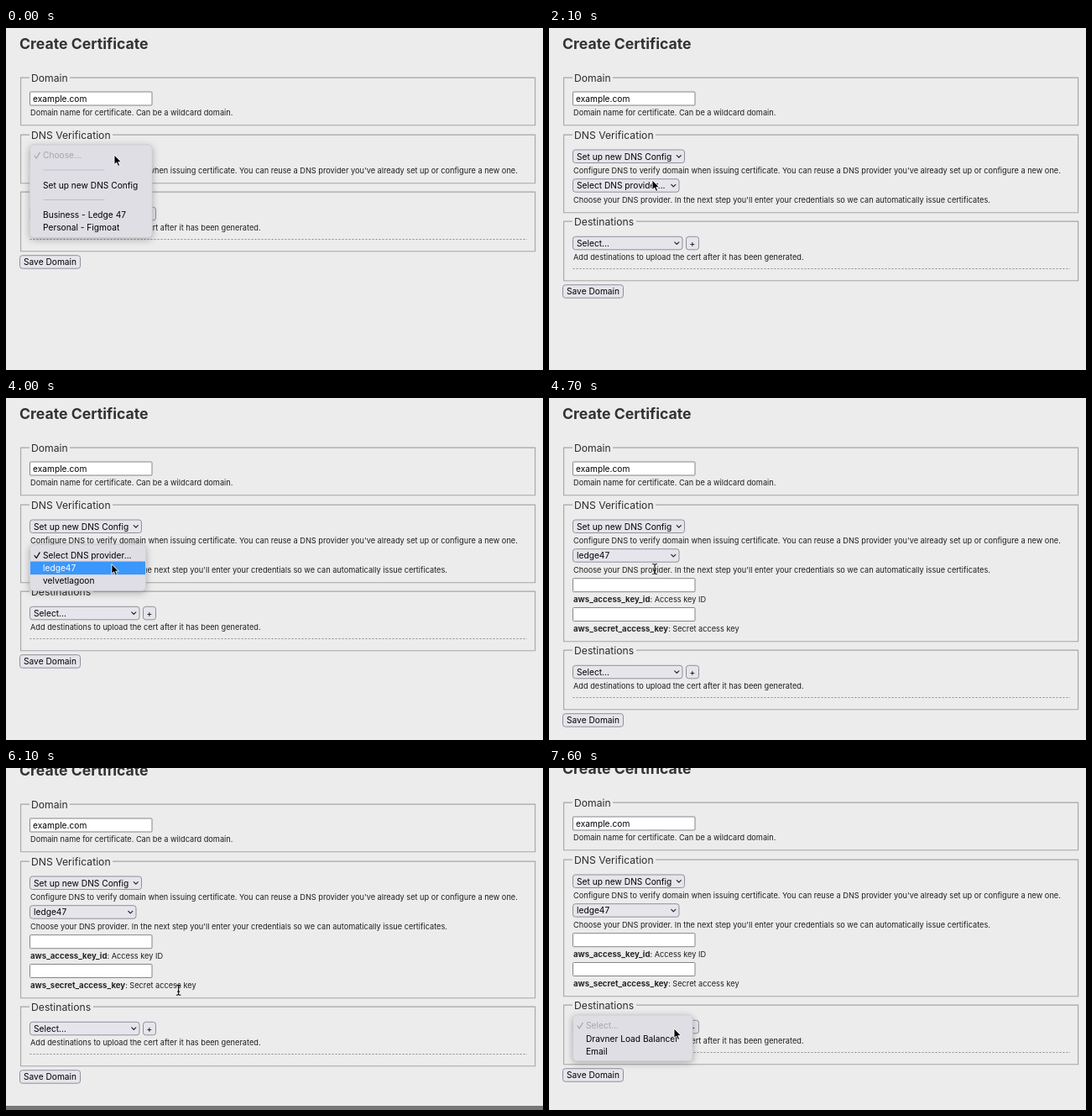
An HTML page that plays this animation: 640 px wide and 407 px high, repeating every 8000 ms.

```html
<!DOCTYPE html>
<html lang="en">
<head>
<meta charset="utf-8">
<title>Create Certificate</title>
<style>
  html, body { margin: 0; width: 100%; height: 100%; overflow: hidden; background: #ececec; }
  svg { display: block; width: 100vw; height: 100vh; font-family: Inter, "Noto Sans", sans-serif; }
  text { white-space: pre; }
  .title { font-size: 17.65px; font-weight: 700; fill: #333; }
  .legend { font-size: 12.2px; fill: #2c2c2c; }
  .note { font-size: 9.2px; fill: #1e1e1e; }
  .key { font-size: 9.65px; font-weight: 700; fill: #262626; }
  .ui { font-size: 10.2px; fill: #000; }
  .off { fill: #a6a5ac; }
  .frame { fill: none; stroke: #a6a6a6; stroke-width: 1.1; }
  .box { fill: #fff; stroke: #85858c; }
  .button { fill: #e6e5ec; stroke: #8f8f9d; }
  .mark { fill: none; stroke-width: 1.2; stroke-linecap: round; stroke-linejoin: round; }
  .panel { fill: #dfdee5; stroke: #c6c5cc; stroke-width: .6; filter: drop-shadow(0 2px 4px rgba(0,0,0,.28)); }
</style>
</head>
<body>
<svg id="stage" viewBox="0 0 640 407"></svg>
<script>
const LOOP = 8000, STEP = 100;
const BLUE = '#3b97fb';

const text = (cls, x, y, s, attrs = '') => `<text class="${cls}" x="${x}" y="${y}" ${attrs}>${s}</text>`;
const rect = (cls, x, y, w, h, r = 0) =>
  `<rect class="${cls}" x="${x}" y="${y}" width="${w}" height="${h}" rx="${r}"/>`;
const input = (y, value = '') => rect('box', 28.5, y, 145.5, 16, 1) + text('ui', 32, y + 12, value);
const button = (x, y, w, s, tx) => rect('button', x, y, w, 15.5, 3) + text('ui', tx, y + 11.6, s);
const select = (y, w, s, id = '') => rect('button', 28.5, y, w, 15.5, 3) +
  text('ui', 33, y + 11.6, s, id && `id="${id}"`) +
  `<path class="mark" stroke="#222" d="M${w + 19.3} ${y + 6.6}l2.5 2.5 2.5-2.5"/>`;
const frame = (top, bottom, gapEnd) => `M28 ${top}H17.6V${bottom}H630.6V${top}H${gapEnd}`;
const fieldset = (top, bottom, gapEnd, name, id = '') =>
  `<path class="frame" id="${id}" d="${frame(top, bottom, gapEnd)}"/>` + text('legend', 30, top + 5, name);
const tick = (y, color) => `<path class="mark" stroke="${color}" d="M34 ${y}l2.2 3 4-6.6"/>`;
const rule = y => `<path stroke="#bdbcc3" d="M44.5 ${y}H117.5"/>`;
const key = (y, name, label) =>
  `<text x="29" y="${y}"><tspan class="key">${name}</tspan><tspan class="note">: ${label}</tspan></text>`;

// rows: [centre y, label, id, class]
const menu = (id, top, w, h, rows, extra = '') => `<g id="${id}">` + rect('panel', 28.3, top, w, h, 5) +
  `<rect id="${id}Hover" x="29" width="${w - 1.5}" height="15.6" fill="${BLUE}" opacity="0"/>` + extra +
  rows.map(([y, s, rowId, cls = '']) => text('ui ' + cls, 44, y + 3.7, s, rowId ? `id="${rowId}"` : '')).join('') + '</g>';

document.getElementById('stage').innerHTML = `
<rect width="640" height="407" fill="#ececec"/>
<g id="page">
  ${text('title', 16, 25, 'Create Certificate')}
  ${fieldset(59.1, 115.8, 76, 'Domain')}
  ${input(76, 'example.com')}
  ${text('note', 29, 104, 'Domain name for certificate. Can be a wildcard domain.')}
  ${fieldset(127.1, 184.8, 127, 'DNS Verification', 'dnsFrame')}
  ${select(145, 133, 'Choose...', 'config')}
  ${text('note', 29, 172.7, "Configure DNS to verify domain when issuing certificate. You can reuse a DNS provider you've already set up or configure a new one.")}
  <g id="providerField">
    ${select(179.7, 126.5, 'Select DNS provider...', 'provider')}
    ${text('note', 29, 207.5, "Choose your DNS provider. In the next step you'll enter your credentials so we can automatically issue certificates.")}
  </g>
  <g id="keyFields">
    ${input(214.7)}${key(243, 'aws_access_key_id', 'Access key ID')}
    ${input(249.5)}${key(277.6, 'aws_secret_access_key', 'Secret access key')}
  </g>
  <g id="lower">
    ${fieldset(195.1, 265.8, 104, 'Destinations')}
    ${select(213.3, 130.5, 'Select...')}
    ${button(163.5, 213.3, 15, '+', 167.5)}
    ${text('note', 29, 241, 'Add destinations to upload the cert after it has been generated.')}
    <path stroke="#8c8c8c" stroke-dasharray="2 2" d="M28.5 251.5H621"/>
    ${button(16.5, 270.7, 72, 'Save Domain', 21)}
  </g>
</g>
<rect id="bar" y="402" width="640" height="5" fill="#777"/>
${menu('configMenu', 139, 146, 110.5, [
  [151.5, 'Choose...', '', 'off'], [187, 'Set up new DNS Config', 'newRow'],
  [222, 'Business - Ledge 47'], [237.7, 'Personal - Figmoat']
], tick(152, '#a6a5ac') + rule(169) + rule(204.5))}
${menu('providerMenu', 174.5, 138.5, 55, [
  [187, 'Select DNS provider...', 'firstRow'], [202, 'ledge47', 'secondRow'], [217.7, 'velvetlagoon']
], '<g id="firstTick">' + tick(187.5, 'currentColor') + '</g>')}
${menu('destMenu', 294, 143, 54.7, [
  [306.3, 'Select...', '', 'off'], [321.8, 'Dravner Load Balancer'], [337.3, 'Email']
], tick(307, '#a6a5ac'))}
<path id="arrow" fill="#000" stroke="#fff" stroke-width=".9" d="M0 0V11.6L2.7 9.1 4.6 13.4 6.6 12.5 4.8 8.4H8.5Z"/>
<path id="beam" fill="none" stroke="#111" stroke-width="1.1" d="M-2.8-6Q0-6 0-4.5Q0-6 2.8-6M0-4.5V4.5M-2.8 6Q0 6 0 4.5Q0 6 2.8 6M-1.5 1.8H1.5"/>`;

const el = {};
document.querySelectorAll('[id]').forEach(n => { if (n.id) el[n.id] = n; });

const clamp = v => Math.max(0, Math.min(1, v));
const ease = v => v * v * (3 - 2 * v);
const show = (node, on) => node.setAttribute('opacity', +on);
const shift = (node, x, y) => node.setAttribute('transform', `translate(${x} ${y})`);
const span = (t, a, b) => t >= a && t < b;

// [start, end, x, y]: the pointer eases to x,y in that time
const moves = [
  [800, 1400, 123, 181], [2400, 2600, 125.5, 187], [3800, 4100, 126, 201.5],
  [5100, 5600, 205.6, 262.3], [6200, 6700, 149, 310]
];
function pointer(t) {
  let x = 129, y = 151;
  for (const [a, b, mx, my] of moves) {
    const k = ease(clamp((t - a) / (b - a)));
    x += (mx - x) * k;
    y += (my - y) * k;
  }
  return [x, y];
}

function scrollAt(t) {
  if (t < 5900) return 0;
  if (t < 6100) return 2 + 14 * (t - 5900) / 200;
  return 16 + 2 * clamp((t - 6100) / 200);
}

function hover(node, y) {
  show(node, y !== null);
  if (y !== null) node.setAttribute('y', y);
}

function draw(t) {
  const grow = t < 1900 ? 0 : t < 4600 ? 35 : 105;
  shift(el.page, 0, -scrollAt(t));
  shift(el.lower, 0, grow);
  el.dnsFrame.setAttribute('d', frame(127.1, 184.8 + grow, 127));
  show(el.providerField, grow > 0);
  show(el.keyFields, grow > 35);
  el.config.textContent = grow ? 'Set up new DNS Config' : 'Choose...';
  el.provider.textContent = grow > 35 ? 'ledge47' : 'Select DNS provider...';
  show(el.bar, span(t, 5900, 7200));

  const [x, y] = pointer(t);

  show(el.configMenu, 1 - clamp((t - 1700) / 400));
  const onNew = y >= 178.5 && !span(t, 1600, 1700);
  hover(el.configMenuHover, onNew ? 179 : null);
  el.newRow.style.fill = onNew ? '#fff' : '#000';

  show(el.providerMenu, t < 3200 ? 0 : 1 - clamp((t - 4500) / 200));
  const row = span(t, 4500, 4600) ? 0 : y < 194.5 ? 1 : 2;
  hover(el.providerMenuHover, [null, 179, 194.5][row]);
  el.firstRow.style.fill = el.firstTick.style.color = row === 1 ? '#fff' : '#000';
  el.secondRow.style.fill = row === 2 ? '#fff' : '#000';

  show(el.destMenu, t >= 7200);

  const beam = span(t, 4700, 5500) || span(t, 6000, 6400);
  show(el.beam, beam);
  show(el.arrow, !beam);
  shift(el.arrow, x, y);
  shift(el.beam, x, y + 2);
}

const start = performance.now();
function tickFrame(now) {
  const t = Math.max(0, now - start) % LOOP;
  draw(Math.floor(t / STEP) * STEP);
  requestAnimationFrame(tickFrame);
}
draw(0);
requestAnimationFrame(tickFrame);
</script>
</body>
</html>
```
